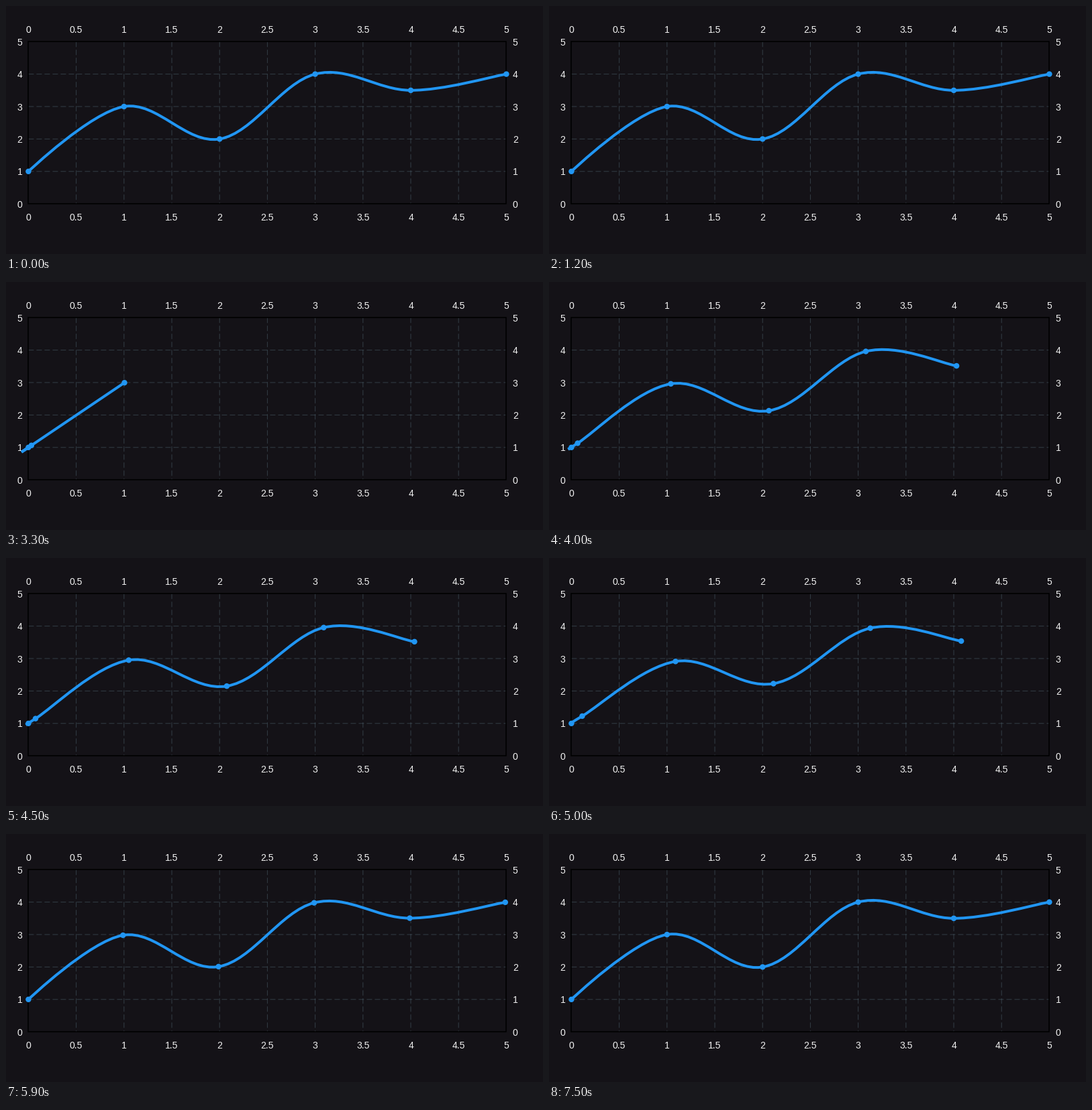
A matplotlib script that plays this animation: 800 px wide and 370 px high, repeating every 7.6 s.

```python
import numpy as np
import matplotlib.pyplot as plt
from matplotlib.animation import FuncAnimation
from matplotlib.patches import Circle, PathPatch, Rectangle
from matplotlib.path import Path

W, H, DPI = 800, 370, 100
STEP, LOOP = 100, 7600
PX = 72 / DPI

BG, BLUE, GRID, TEXT = "#141217", "#2196f3", "#607d8b", "#f0f0f0"
LEFT, RIGHT, TOP, BOTTOM = 33.4, 745.4, 53.2, 295.2
SMOOTH = 0.35

SPOTS = np.array([(0, 1), (1, 3), (2, 2), (3, 4), (4, 3.5), (5, 4)], float)
BORN = [0, 3090, 3290, 3490, 3690, 3890]
DRIFT = [0, 0.065, 0.04, 0.066, 0.08, 0.029]
SETTLED = 4000

plt.rcParams["font.family"] = "Liberation Sans"
fig = plt.figure(figsize=(W / DPI, H / DPI), dpi=DPI, facecolor=BG)
ax = fig.add_axes([0, 0, 1, 1])


def clamp(v):
    return min(max(v, 0.0), 1.0)


def ease_in_out_cubic(x):
    return 4 * x**3 if x < 0.5 else 1 - (2 - 2 * x) ** 3 / 2


def visibility(ms):
    """Opacity of the whole chart."""
    if ms < 1700:
        return 1.0
    if ms < 1800:
        return 0.35
    return clamp((ms - 2200) / 800)


def spots_at(ms):
    """Every spot starts on its predecessor and slides to its own place."""
    if ms < 1800:
        return SPOTS
    slow = 0.012 * clamp((ms - SETTLED) / 600)
    main = ease_in_out_cubic(clamp((ms - 4700) / 1400))
    left = (1 - slow) * (1 - main)
    spots = [SPOTS[0]]
    for i in range(1, len(SPOTS)):
        if ms < BORN[i]:
            break
        age = clamp((ms - BORN[i]) / (SETTLED - BORN[i]))
        t = 1 - (1 - DRIFT[i] * np.sqrt(age)) * left
        spots.append(SPOTS[i - 1] + (SPOTS[i] - SPOTS[i - 1]) * t)
    return np.array(spots)


def smooth_path(pts):
    verts, codes = [pts[0]], [Path.MOVETO]
    prev = np.zeros(2)
    for i in range(1, len(pts)):
        after = pts[min(i + 1, len(pts) - 1)]
        tangent = (after - pts[i - 1]) / 2 * SMOOTH
        verts += [pts[i - 1] + prev, pts[i] - tangent, pts[i]]
        codes += [Path.CURVE4] * 3
        prev = tangent
    return Path(verts, codes)


def label(x, y, value):
    ax.text(x, y, f"{value:g}", color=TEXT, fontsize=14 * PX,
            ha="center", va="baseline")


def dashed(xs, ys):
    ax.plot(xs, ys, color=GRID, lw=PX, alpha=0.4, zorder=1, snap=False,
            dashes=(8, 4), dash_capstyle="butt")


def draw_frame(top, bottom):
    """Draw axes and grid; return the mapping from data to pixels."""
    def to_px(p):
        p = np.asarray(p, float)
        return np.stack([LEFT + p[..., 0] * (RIGHT - LEFT) / 5,
                         bottom - p[..., 1] * (bottom - top) / 5], -1)

    for v in np.arange(0, 5.1, 0.5):
        x = to_px((v, 0))[0]
        label(x, top - 13.2, v)
        label(x, bottom + 25, v)
        if 0 < v < 5:
            dashed([x, x], [top, bottom])
    for v in range(6):
        y = to_px((0, v))[1]
        label(20.5, y + 5.5, v)
        label(758.7, y + 5.5, v)
        if 0 < v < 5:
            dashed([LEFT, RIGHT], [y, y])
    ax.add_patch(Rectangle((LEFT, top), RIGHT - LEFT, bottom - top, fill=False,
                           ec="black", lw=1.6 * PX, zorder=2))
    return to_px


def draw(i):
    ms = i * STEP
    ax.clear()
    ax.set(xlim=(0, W), ylim=(H, 0))
    ax.axis("off")
    alpha = visibility(ms)
    if alpha == 0:
        return []
    inset = 25 * (1 - alpha) if ms >= 2200 else 0
    to_px = draw_frame(TOP + inset, BOTTOM - inset)

    pts = to_px(spots_at(ms))
    if len(pts) > 1:
        ax.add_patch(PathPatch(smooth_path(pts), fill=False, ec=BLUE,
                               lw=4 * PX, capstyle="butt",
                               joinstyle="bevel", zorder=4))
    for p in pts:
        ax.add_patch(Circle(p, 4.2, fc=BLUE, lw=0, zorder=5))
    if alpha < 1:
        ax.add_patch(Rectangle((0, 0), W, H, fc=BG, lw=0,
                               alpha=1 - alpha, zorder=10))
    return []


anim = FuncAnimation(fig, draw, frames=LOOP // STEP, interval=STEP,
                     init_func=lambda: [], repeat=True, repeat_delay=0)
plt.show()
```
